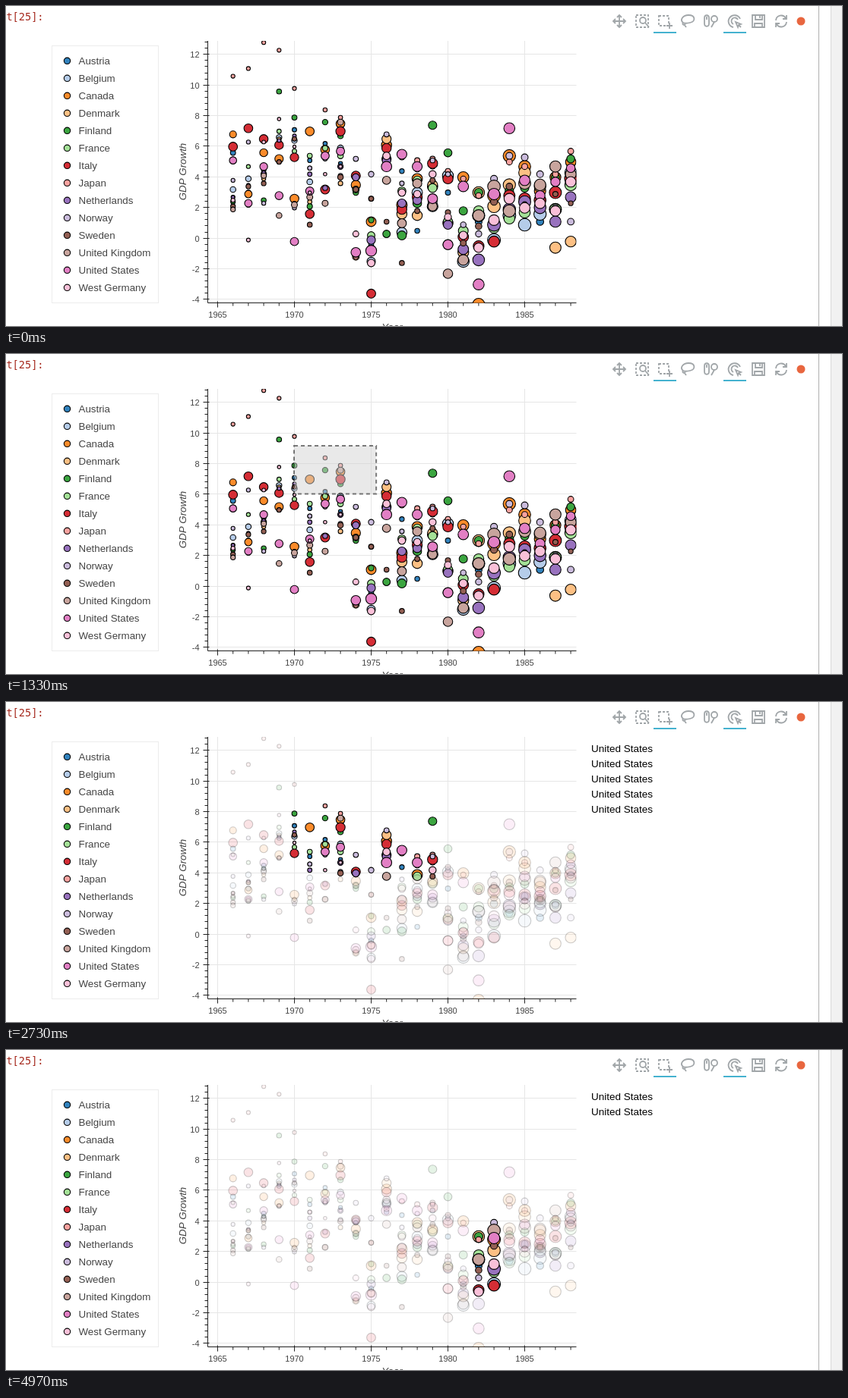
Write an HTML page with a canvas that moves like this. It is 1100x422 px and loops after 5.04 s.

```html
<!DOCTYPE html>
<html lang="en">
<head>
<meta charset="utf-8">
<title>Linked selection</title>
<style>
  html, body { margin: 0; width: 100%; height: 100%; overflow: hidden; background: #fff; }
  canvas { display: block; }
</style>
</head>
<body>
<canvas id="stage" width="1100" height="422"></canvas>
<script>
const ctx = document.getElementById('stage').getContext('2d');
const SANS = '"Liberation Sans", Arial, sans-serif';
const LOOP = 5040, STEP = 70;
const PLOT = { left: 265.5, right: 750.5, top: 46, bottom: 391.5 };
const FIRST_YEAR = 1966;
const px = year => 278.5 + (year - 1965) * 20.2;
const py = growth => 306.6 - growth * 20.19;

// Each drag grows a box from its top left corner; the selection lands on release.
const drags = [
  { x: 379, y: 121, w: 187, h: 110, start: 850, end: 1680, release: 2030, rows: 5 },
  { x: 613, y: 185, w: 38, h: 141, start: 3290, end: 3850, release: 4130, rows: 2 }
];

// Marker area follows unemployment, interpolated between these years.
const knots = [1966, 1970, 1973, 1975, 1977, 1980, 1983, 1988];
function unemployment(rates, year) {
  let i = 0;
  while (i < knots.length - 2 && year > knots[i + 1]) i++;
  const f = (year - knots[i]) / (knots[i + 1] - knots[i]);
  return rates[i] + (rates[i + 1] - rates[i]) * f;
}

const countries = [];
function country(name, color, rates, growth) {
  const points = growth.map((g, i) => ({
    x: px(FIRST_YEAR + i),
    y: py(g),
    r: 2.45 * Math.sqrt(unemployment(rates, FIRST_YEAR + i))
  }));
  countries.push({ name, color, points });
}

country('Austria', '#3182bd', [1.9, 1.4, 1.2, 1.8, 1.6, 1.9, 4.1, 3.6],
  [5.6, 3, 4.5, 6.3, 7.1, 5.1, 6.2, 4.9, 3.9, -.4, 4.6, 4.4, .5, 4.7, 3, -.1, 1.1, 2, 1.4, 2.5, 1.1, 1.9, 3.9]);
country('Belgium', '#b5cce9', [2.3, 2.2, 2.8, 5.1, 7.4, 8.8, 12.1, 10.3],
  [3.2, 3.9, 4.2, 6.6, 6.4, 3.7, 5.3, 5.9, 4.1, -1.5, 5.2, .4, 3, 2.1, 4.1, -1.5, 1.5, -.1, 1.5, .9, 1.6, 1.9, 4.3]);
country('Canada', '#fb8b2a', [3.4, 5.7, 5.5, 6.9, 8.1, 7.5, 11.9, 7.8],
  [6.8, 2.9, 5.6, 5.2, 2.6, 7, 5.8, 7.5, 3.5, 1.1, 6.1, 2.2, 3.9, 3.4, 1, 4, -4.3, 2.8, 5.4, 4.7, 3.1, 4, 5]);
country('Denmark', '#fdc084', [1.1, 1.2, 1.5, 4.9, 7.4, 7, 11.4, 8.6],
  [2.7, 3.4, 3.9, 6.5, 2.3, 2.4, 5.3, 3.6, -1.2, -.7, 6.5, 1.6, 1.5, 3.5, -.4, -.9, 3, 2.1, 3.5, 4.3, 3.4, -.6, -.2]);
country('Finland', '#3ba540', [1.5, 1.9, 2.3, 2.2, 5.8, 4.7, 5.4, 4.5],
  [2.4, 2.2, 2.5, 9.6, 7.9, 2.1, 7.6, 6.7, 3, 1.2, .3, .2, 2.3, 7.4, 5.6, 1.8, 3, 3, 3.1, 3.3, 2.3, 4, 5.2]);
country('France', '#a4e197', [1, 1.5, 2.4, 4, 4.7, 6.3, 8.3, 10],
  [5.2, 4.7, 4.3, 7, 5.7, 5.4, 5.9, 5.4, 3.2, .2, 5.2, 3.1, 3.8, 3.3, 1.1, .5, 1.8, .7, 1.3, 1.7, 2.1, 1.9, 3.5]);
country('Italy', '#d52d35', [5.7, 5.3, 6.2, 5.8, 7, 7.5, 8.8, 11],
  [6, 7.2, 6.5, 6.1, 5.3, 1.6, 3.2, 7, 4.1, -3.6, 5.9, 1.9, 2.7, 4.9, 3.9, .1, -.5, -.2, 2.8, 2.6, 2.5, 3, 3.9]);
country('Japan', '#fba29f', [1.1, 1.1, 1.3, 1.9, 2, 2, 2.6, 2.5],
  [10.6, 11.1, 12.8, 12.3, 9.8, 4.6, 8.4, 7.9, -1.2, 2.6, 4.8, 5.3, 5.1, 5.2, 4.4, 3.9, 2.8, 3.2, 5, 4.7, 2.4, 4.2, 5.7]);
country('Netherlands', '#9872be', [.8, 1, 2.2, 5.2, 5.3, 6, 12, 8.3],
  [2.7, 3.5, 4.3, 6.4, 6.7, 4.2, 3.3, 4.7, 4, -.1, 5.1, 2.3, 2.5, 2.4, .9, -.7, -1.4, .9, 1.9, 2.4, 2, 1.1, 2.7]);
country('Norway', '#cabbdc', [1.1, 1.2, 1.5, 2.2, 1.5, 1.7, 3.4, 3.2],
  [3.8, 6.3, 2.3, 5, 2, 4.6, 5.2, 4.1, 5.2, 4.2, 6.8, 3.6, 4.5, 5.1, 4.2, .9, .3, 3.9, 5.4, 5.3, 4.2, 2, 1.1]);
country('Sweden', '#935f53', [1.6, 1.5, 2.3, 1.6, 1.8, 2, 3.5, 1.6],
  [2.1, 3.4, 3.6, 5, 6.5, .9, 2.3, 4, 3.2, 2.6, 1.1, -1.6, 1.8, 3.8, 1.7, -.3, .8, 2.4, 3.4, 2.2, 2.3, 2.9, 2.3]);
country('United Kingdom', '#c8a49d', [1.6, 2.6, 2.6, 3.9, 5.8, 6.5, 11.5, 8.5],
  [1.9, 2.3, 4.1, 1.5, 2.2, 2.7, 2.3, 7.6, -1, -.7, 3.8, 1, 3.6, 2.1, -2.3, -1.4, 1.5, 3.4, 1.8, 3.6, 3.5, 4.7, 4.2]);
country('United States', '#e27fc4', [3.8, 4.9, 4.9, 8.5, 7.1, 7.1, 9.6, 5.5],
  [5.1, 2.3, 4.7, 2.8, -.2, 3.1, 5.4, 5.7, -.9, -.8, 4.7, 5.5, 4.7, 2.6, -.4, 3.4, -3, 2.9, 7.2, 3.8, 2.8, 3.7, 4.6]);
country('West Germany', '#f9c0d8', [1.2, .7, .9, 4.1, 4, 3.5, 8.2, 7.9],
  [2.5, -.1, 6.3, 7.8, 6, 3, 4.2, 4.7, .3, -1.6, 5.4, 3, 2.9, 4.2, 1.4, .2, -.6, 1.2, 2.6, 2, 2.3, 1.8, 3.7]);

function text(str, x, y, size, color, align = 'left', style = '', family = SANS) {
  ctx.font = `${style} ${size}px ${family}`;
  ctx.fillStyle = color;
  ctx.textAlign = align;
  ctx.fillText(str, x, y);
}

function line(x1, y1, x2, y2, color, width = 1) {
  ctx.strokeStyle = color;
  ctx.lineWidth = width;
  ctx.beginPath();
  ctx.moveTo(x1, y1);
  ctx.lineTo(x2, y2);
  ctx.stroke();
}

function marker({ x, y, r }, color, dim) {
  ctx.beginPath();
  ctx.arc(x, y, r, 0, 7);
  ctx.fillStyle = color;
  ctx.globalAlpha = dim ? .13 : 1;
  ctx.fill();
  ctx.strokeStyle = '#000';
  ctx.lineWidth = 1.1;
  ctx.globalAlpha = dim ? .2 : 1;
  ctx.stroke();
  ctx.globalAlpha = 1;
}

// Icon outlines, each centred on its own origin.
function icon(x, path, dash = []) {
  ctx.save();
  ctx.translate(x, 20);
  ctx.strokeStyle = '#a1a6a9';
  ctx.lineWidth = 1.8;
  ctx.setLineDash(dash);
  ctx.stroke(new Path2D(path));
  ctx.restore();
}

function drawToolbar() {
  icon(807, 'M-8 0H8M0-8V8M-5-3L-8 0L-5 3M5-3L8 0L5 3M-3-5L0-8L3-5M-3 5L0 8L3 5');
  icon(837, 'M-8-8H8V8H-8Z', [3, 2]);
  icon(838, 'M4-1A4 4 0 1 1-4-1A4 4 0 1 1 4-1M3 2L8 8');
  icon(866, 'M-7-7H6V6H-7Z', [3, 2]);
  icon(873, 'M-4 6H4M0 2V10');
  icon(897, 'M-6 2C-11-2-6-8 1-8C10-8 11 0 3 2C-1 3-4 3-6 2C-8 4-5 6-3 4M-5 4L-2 8');
  icon(928, 'M-9-4C-9-9-3-9-3-4V3C-3 8-9 8-9 3ZM-6-6V-2M8-3A4 4 0 1 1 0-3A4 4 0 1 1 8-3M4 1L0 8');
  icon(959, 'M7-3A8 8 0 1 0-2 8M4-2A4.5 4.5 0 1 0-2 4M1 1L8 4L5 5L4 8ZM5 5L8 8');
  icon(990, 'M-8-8H8V8H-8ZM-4-8V-2H5V-8M2-7V-4M-5 8V3H5V8');
  icon(1020, 'M-7-1A7 7 0 0 1 6-4M7 1A7 7 0 0 1-6 4M7-8V-3H2M-7 8V3H-2');
  for (const x of [852, 944]) line(x, 35, x + 30, 35, '#45b2cf', 2);
  ctx.fillStyle = '#e8663f';
  ctx.beginPath();
  ctx.arc(1046, 20, 5.5, 0, 7);
  ctx.fill();
}

function drawPage() {
  ctx.fillStyle = '#fff';
  ctx.fillRect(0, 0, 1100, 422);
  ctx.fillStyle = '#f1f1f1';
  ctx.fillRect(1086, 0, 14, 422);
  line(1085.5, 0, 1085.5, 422, '#d8d8d8');
  line(1069.5, 0, 1069.5, 422, '#b0b0b0');
  text('t[25]:', 49.5, 19, 13.6, '#a5281d', 'right', '', '"DejaVu Sans Mono", monospace');
  drawToolbar();

  ctx.strokeStyle = '#ececec';
  ctx.lineWidth = 1;
  ctx.strokeRect(60.5, 52.5, 140, 339);
  countries.forEach(({ name, color }, i) => {
    const y = 72 + 23 * i;
    marker({ x: 80.5, y: y + .3, r: 4.2 }, color);
    text(name, 95.5, y + 4.7, 13.33, '#444');
  });
}

function drawAxes() {
  const { left, right, top, bottom } = PLOT;
  const ink = '#222';
  for (let year = 1965; year <= 1988; year++) {
    const x = px(year), major = year % 5 === 0;
    if (major) {
      line(x, top, x, bottom, '#e6e6e6');
      text(year, x, 411, 11, '#444', 'center');
    }
    line(x, major ? bottom - 2 : bottom, x, bottom + (major ? 6 : 4), ink);
  }
  for (let i = -10; i <= 32; i++) {
    const y = Math.round(py(i * .4)) - .5, major = i % 5 === 0;
    if (major) {
      line(left, y, right, y, '#e6e6e6');
      text(i * .4, 254.5, y + 4.3, 11, '#444', 'right');
    }
    line(left - (major ? 6 : 4), y, major ? left + 2 : left, y, ink);
  }
  line(left, top, left, bottom, ink);
  line(left, bottom, right, bottom, ink);
  text('Year', 508, 428, 13.33, '#444', 'center', 'italic');
  ctx.save();
  ctx.translate(237, 218.5);
  ctx.rotate(-Math.PI / 2);
  text('GDP Growth', 0, 0, 13.33, '#444', 'center', 'italic');
  ctx.restore();
}

const inside = (p, d) => p.x >= d.x && p.x <= d.x + d.w && p.y >= d.y && p.y <= d.y + d.h;

function drawPoints(selection) {
  ctx.save();
  ctx.beginPath();
  ctx.rect(PLOT.left, PLOT.top, PLOT.right - PLOT.left, PLOT.bottom - PLOT.top);
  ctx.clip();
  for (const { color, points } of countries)
    for (const p of points) marker(p, color, selection && !inside(p, selection));
  ctx.restore();
}

function drawDrag(d, t) {
  const f = Math.min(1, (t - d.start) / (d.end - d.start));
  const box = [d.x, d.y, d.w * f, d.h * f];
  ctx.save();
  ctx.fillStyle = 'rgba(211, 211, 211, .5)';
  ctx.fillRect(...box);
  ctx.strokeStyle = 'rgba(0, 0, 0, .5)';
  ctx.lineWidth = 2;
  ctx.setLineDash([5, 4]);
  ctx.strokeRect(...box);
  ctx.restore();
}

function frame(now) {
  const t = Math.floor(now % LOOP / STEP) * STEP;
  const selection = drags.filter(d => t >= d.release).pop();
  const drag = drags.find(d => t > d.start && t < d.release);
  drawPage();
  drawAxes();
  drawPoints(selection);
  if (drag) drawDrag(drag, t);
  if (selection)
    for (let i = 0; i < selection.rows; i++) text('United States', 770, 66 + 20 * i, 13.5, '#000');
  requestAnimationFrame(frame);
}
requestAnimationFrame(frame);
</script>
</body>
</html>
```
